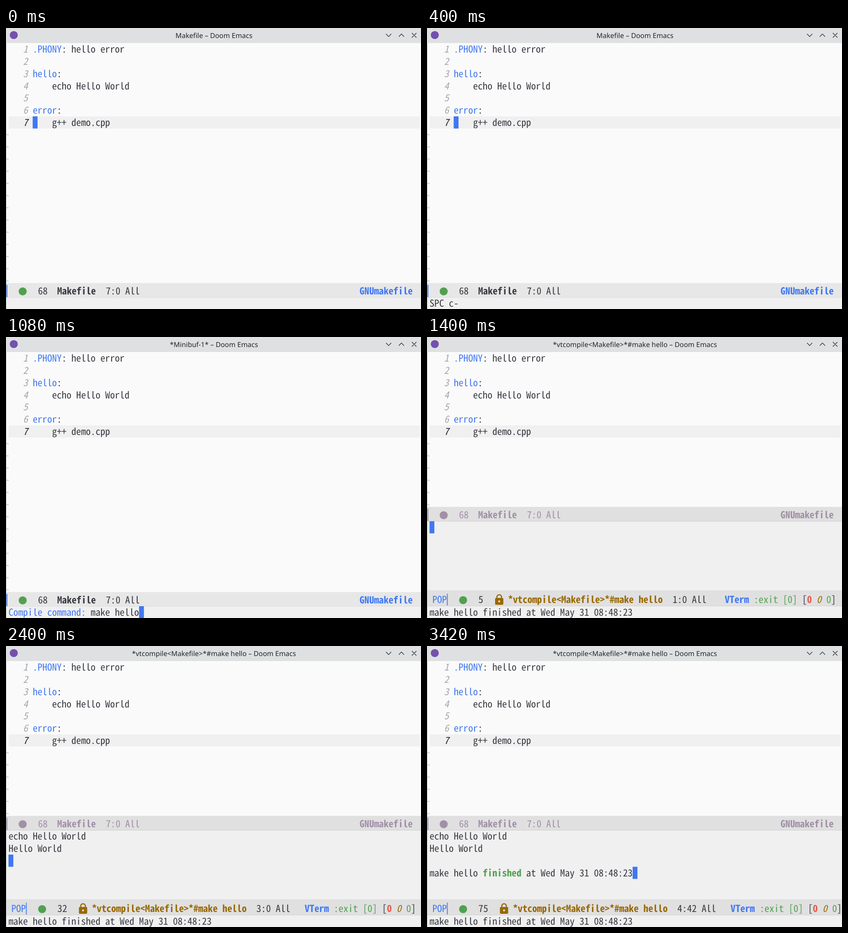
Recreate the animation shown at these times as an HTML page. Size 908x617 px, loop 3700 ms.

```html
<!DOCTYPE html>
<html lang="en">
<head>
<meta charset="utf-8">
<title>Makefile editor</title>
<style>
  html, body { margin: 0; width: 100%; height: 100%; overflow: hidden; background: #fafafa; }
  svg { display: block; width: 100%; height: 100%; }
  text { white-space: pre; text-rendering: geometricPrecision; font-variant-ligatures: none; }
  .title { font: 15.1px "Noto Sans", sans-serif; text-anchor: middle; fill: #232629; }
  .icon { fill: none; stroke: #232629; stroke-width: 1.2; }
  .tildes { fill: none; stroke: #8b8d92; stroke-width: .9; }
</style>
</head>
<body>
<svg id="stage" viewBox="0 0 908 617"></svg>
<script>
const stage = document.getElementById("stage");
const LOOP = 3700;
const CELL = 10.58, ROW = 26.75, LEFT = 5.5, TOP = 33.3;
const INK = "#383a42", BLUE = "#4078f2", GREEN = "#50a14f", RED = "#e45649",
      BROWN = "#986801", MUTED = "#a190a7", NUMBER = "#a5a7ab";
const MONO = "'Noto Sans Mono CJK JP', 'Noto Sans Mono CJK SC', 'Noto Sans Mono', monospace";

// Choose the font size whose natural advance is one cell.
const ruler = document.createElement("canvas").getContext("2d");
ruler.font = `100px ${MONO}`;
const fontSize = CELL * 100 / ruler.measureText("0").width;
stage.style.font = `${fontSize}px ${MONO}`;

const steps = [
  { at: 0,    title: "Makefile" },
  { at: 200,  title: "Makefile", keys: "SPC-" },
  { at: 400,  title: "Makefile", keys: "SPC c-" },
  { at: 600,  title: "*Minibuf-1*", prompt: true },
  { at: 1400, popup: { size: "5",  position: "1:0 All",  right: 651.5, output: 0, cursor: [0, 0] } },
  { at: 1500, popup: { size: "32", position: "3:0 All",  right: 653.5, output: 2, cursor: [0, 2] } },
  { at: 3000, popup: { size: "75", position: "4:42 All", right: 664.3, output: 4, cursor: [42, 3] } },
];

const escape = s => s.replace(/&/g, "&amp;").replace(/</g, "&lt;");
const column = n => LEFT + n * CELL;
const rect = (x, y, w, h, fill) =>
  `<rect x="${x}" y="${y}" width="${w}" height="${h}" fill="${fill}"/>`;
const dot = (x, y, fill) => `<circle cx="${x}" cy="${y}" r="8.8" fill="${fill}"/>`;
const run = (s, fill = INK, style = "") => {
  const css = style === "bold" ? "font-weight:700" : style === "italic" ? "font-style:italic" : "";
  return `<tspan fill="${fill}" style="${css}">${escape(s)}</tspan>`;
};
const text = (x, baseline, ...runs) => `<text x="${x}" y="${baseline}">${runs.join("")}</text>`;
const cursor = (x, y) => rect(x, y, CELL, 26.7, BLUE);

function titleBar(title) {
  return rect(0, 0, 908, 33, "#dee0e2") +
    `<circle cx="17" cy="15.5" r="8.8" fill="#7350ad"/>` +
    `<text class="title" x="455" y="21.5">${escape(title)} – Doom Emacs</text>` +
    `<path class="icon" d="M831.5 13l5.7 6 5.7-6M859.5 19l5.7-6 5.7 6M888 11l10 10m0-10l-10 10"/>`;
}

function editor(showCursor, tildeCount) {
  const lines = [
    [run(".PHONY", BLUE), run(": hello error")],
    [],
    [run("hello", BLUE), run(":")],
    [run("    echo Hello World")],
    [],
    [run("error", BLUE), run(":")],
    [run("    g++ demo.cpp")],
  ];
  let out = rect(6, 194, 899, 26.5, "#f0f0f0");
  if (showCursor) out += cursor(column(5), 194);
  lines.forEach((runs, i) => {
    const baseline = TOP + 21 + i * ROW;
    out += text(column(3), baseline, run(String(i + 1), i === 6 ? "#1b2229" : NUMBER, "italic"));
    out += text(column(5), baseline, ...runs);
  });
  let tildes = "";
  for (let i = 0; i < tildeCount; i++) tildes += `M1 ${234.6 + i * ROW}q1.2-1.6 2.4-.3t2.4-.3`;
  return out + `<path class="tildes" d="${tildes}"/>`;
}

function fileModeline(y, active) {
  const color = active ? INK : MUTED, accent = active ? BLUE : MUTED;
  return rect(0, y, 908, 31, active ? "#e7e7e7" : "#e0e0e0") +
    rect(0, y + 31, 908, 1, "#cfcfd0") +
    rect(1, y + 4, 2, 27, accent) +
    dot(36.5, y + 18.3, active ? GREEN : MUTED) +
    text(70, y + 24.5, run("68", color)) +
    text(112, y + 24.5, run("Makefile", color, "bold")) +
    text(218.5, y + 24.5, run("7:0 All", color)) +
    text(773.5, y + 24.5, run("GNUmakefile", accent, "bold"));
}

function lock(x) {
  return `<g transform="translate(${x} 564.5)">` +
    `<path d="M5 10V6.5a5 5 0 0 1 10 0V10" fill="none" stroke="${BROWN}" stroke-width="2.4"/>` +
    `<rect x="1" y="8.5" width="18" height="15" rx="2" fill="${BROWN}"/>` +
    `<circle cx="10" cy="16" r="2.2" fill="#e0e0e0"/></g>`;
}

function popupWindow({ size, position, right, output, cursor: [col, row] }) {
  const lines = [
    [run("echo Hello World")],
    [run("Hello World")],
    [],
    [run("make hello "), run("finished", GREEN, "bold"), run(" at Wed May 31 08:48:23")],
  ];
  const shift = (size.length - 1) * CELL, baseline = 584;
  let out = rect(0, 404, 908, 153, "#f0f0f0") + fileModeline(373, false) +
    cursor(LEFT, 404.5).replace(/x="[^"]*" y="[^"]*"/, `x="${column(col)}" y="${404.5 + row * ROW}"`);
  lines.slice(0, output).forEach((runs, i) => out += text(LEFT, 425.4 + i * ROW, ...runs));
  return out +
    rect(0, 556, 908, 35, "#e0e0e0") + rect(0, 590.5, 908, 1, "#cfcfd0") +
    text(11.7, baseline, run("POP", BLUE)) + rect(43.6, 563.5, 1.7, 26, BLUE) +
    dot(79, 577.8, GREEN) +
    text(112.6, baseline, run(size)) +
    lock(148 + shift) +
    text(177.4 + shift, baseline, run("*vtcompile<Makefile>*#make hello", BROWN, "bold")) +
    text(537.2 + shift, baseline, run(position)) +
    text(right, baseline, run("VTerm", BLUE, "bold"), run(" :exit [0]", GREEN), run(" ["),
      run("0", RED, "bold"), run(" 0", BROWN, "italic"), run(" 0", GREEN), run("]"));
}

function echoArea({ keys, prompt, popup }) {
  const baseline = 612.4;
  let out = rect(0, 591.5, 908, 26, "#f0f0f0");
  if (keys) out += text(LEFT, baseline, run(keys));
  if (prompt) out += text(LEFT, baseline, run("Compile command: ", BLUE), run("make hello")) +
    cursor(column(27), 591);
  if (popup) out += text(LEFT, baseline, run("make hello finished at Wed May 31 08:48:23"));
  return out;
}

function render(step) {
  const { title, prompt, popup } = step;
  stage.innerHTML = rect(0, 0, 908, 617, "#fafafa") +
    titleBar(popup ? "*vtcompile<Makefile>*#make hello" : title) +
    editor(!prompt && !popup, popup ? 6 : 13) +
    (popup ? popupWindow(popup) : fileModeline(560, true)) +
    echoArea(step) +
    rect(0, 33, 1, 584, "#b9bbbe");
}

let shown;
function tick() {
  const time = performance.now() % LOOP;
  const step = steps.findLast(s => s.at <= time);
  if (step !== shown) render(shown = step);
  requestAnimationFrame(tick);
}
tick();
</script>
</body>
</html>
```
